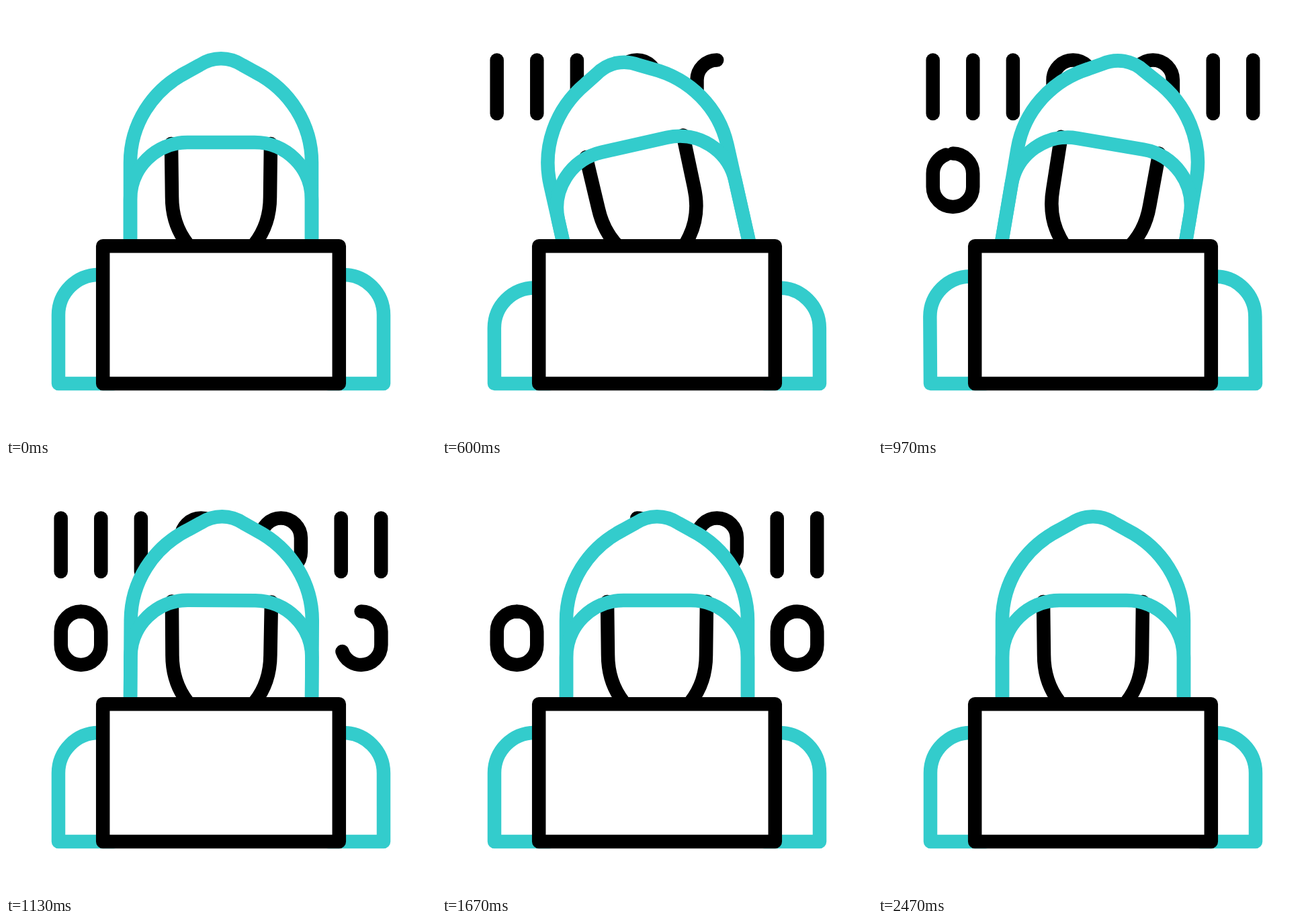
Animation of 640 by 640 pixels, one loop 2500 ms. Source, as an HTML page:

```html
<!DOCTYPE html>
<html lang="en">
<head>
<meta charset="utf-8">
<style>
html, body { margin: 0; height: 100%; overflow: hidden; background: #fff; }
svg { display: block; width: 100%; height: 100%; }
path, rect { fill: #fff; stroke: #000; stroke-width: 20.5; stroke-linecap: round; stroke-linejoin: round; }
.teal { stroke: #33cccc; }
.line { fill: none; }
</style>
</head>
<body>
<svg viewBox="0 0 640 640">
  <g id="digits"></g>
  <g id="head">
    <path class="teal" d="M185 390V233C185 177 217 125 269 98.5L288 88C308 75 332 75 352 88L371 98.5C423 125 455 177 455 233V390"/>
    <path class="line" d="M246 205L247 284C247 312 255 335 270 354S300 385 320 385S355 373 370 354S393 312 393 284L394 205"/>
    <path class="teal line" d="M185 390V288C185 241 223 203 270 203H370C417 203 455 241 455 288V390"/>
  </g>
  <path id="left" class="teal line"/>
  <path id="right" class="teal line"/>
  <rect x="144.2" y="357.2" width="351.6" height="204.8"/>
</svg>
<script>
const LOOP = 2500, DELAY = 40, TICK = 32;
const $ = id => document.getElementById(id);
const clamp = (v, lo, hi) => Math.min(hi, Math.max(lo, v));
const ease = u => u * u * (3 - 2 * u);
const progress = (tick, from, to) => ease(clamp((tick - from) / (to - from), 0, 1));

// keys: [tick, value] pairs, eased between neighbours
function tween(tick, keys) {
  let value = keys[0][1];
  for (let i = 1; i < keys.length; i++) {
    value += (keys[i][1] - keys[i - 1][1]) * progress(tick, keys[i - 1][0], keys[i][0]);
  }
  return value;
}

const one = x => `M${x} 80.5V160`;
const zero = (x, y, dir) => {
  const r = 29.75, arc = `a${r} ${r} 0 0 ${dir > 0 ? 1 : 0} `, w = r * dir;
  return `M${x} ${y}${arc}${w} ${r}v20${arc}${-2 * w} 0v-20${arc}${w} ${-r}`;
};

let total = 0;
const digits = [
  one(81.7), one(141.3), one(200.9), zero(290.3, 80.5, -1), zero(409.2, 80.5, -1),
  one(498.7), one(558.2), zero(111.5, 219.5, 1), zero(528.6, 219.5, 1)
].map(d => {
  const path = document.createElementNS("http://www.w3.org/2000/svg", "path");
  path.setAttribute("d", d);
  path.setAttribute("class", "line");
  $("digits").append(path);
  const length = path.getTotalLength(), start = total;
  total += length;
  return { path, start, length };
});

// Shows the stretch between two distances along the whole row of digits
function trim(from, to) {
  for (const { path, start, length } of digits) {
    const a = clamp(from - start, 0, length), b = clamp(to - start, 0, length);
    path.style.display = b - a > 0.1 ? "" : "none";
    path.style.strokeDasharray = b - a >= length ? "none" : `${b - a} 1000`;
    path.style.strokeDashoffset = -a;
  }
}

function shoulder(id, side, drop, lean) {
  const x = out => 320 + side * out, y = 400 + drop;
  $(id).setAttribute("d", `M${x(160)} ${y}H${x(182) + lean}` +
    `A60 60 0 0 ${side > 0 ? 1 : 0} ${x(242) + lean} ${y + 60}L${x(242)} 562H${x(160)}`);
}

function draw(now) {
  const tick = Math.max(0, (now % LOOP - DELAY) / TICK);
  const angle = tween(tick, [[5, 0], [15, -18], [25, 15.2], [35, 0]]);
  const drop = tween(tick, [[0, 0], [5, 22.5], [15, 22.5], [25, 3.9], [35, 0]]);
  const lean = tween(tick, [[15, 0], [25, -1], [35, 0]]);
  $("head").setAttribute("transform", `rotate(${angle} 320 357)`);
  shoulder("left", -1, drop, lean);
  shoulder("right", 1, drop, lean);
  trim(total * progress(tick, 35, 75), total * progress(tick, 0, 40));
}

const begin = performance.now();
function loop() {
  draw(performance.now() - begin);
  requestAnimationFrame(loop);
}
loop();
</script>
</body>
</html>
```
